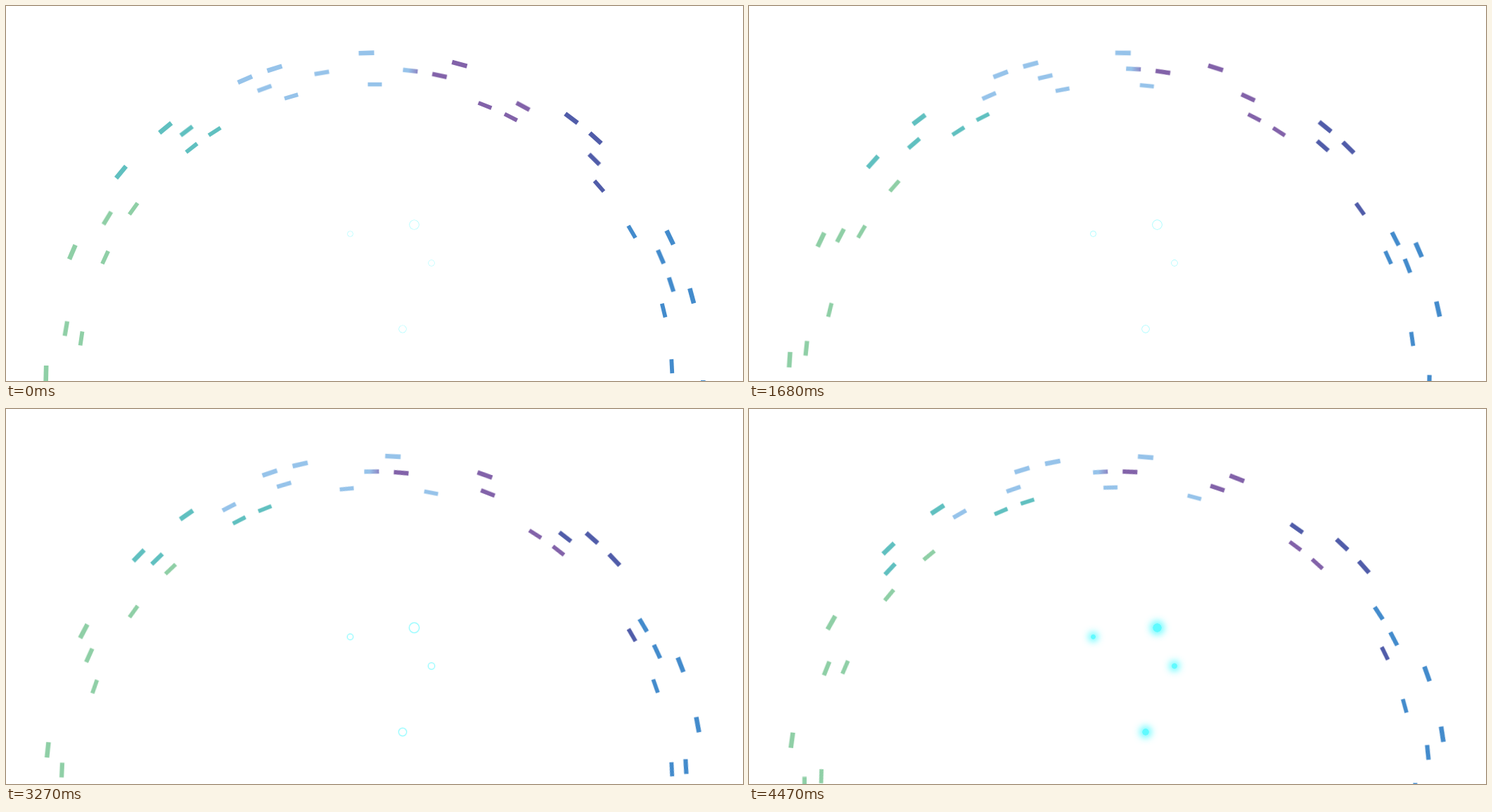
Animation, 1048 px wide and 534 px high, one loop 4500 ms. Source, as an HTML page:

```html
<!DOCTYPE html>
<html lang="en">
<head>
<meta charset="utf-8">
<title>Dashed arcs</title>
<style>
  html, body { margin: 0; width: 100%; height: 100%; overflow: hidden; background: #fff; }
  #stage { position: relative; width: 1048px; height: 534px; overflow: hidden; }
  svg { position: absolute; left: 0; top: 0; }

  .ring { animation: turn 4.5s linear infinite; }
  @keyframes turn { to { transform: rotate(var(--turn)); } }

  .dot {
    position: absolute;
    left: calc(var(--x) - var(--r));
    top: calc(var(--y) - var(--r));
    width: calc(2 * var(--r));
    height: calc(2 * var(--r));
    border-radius: 50%;
    animation: glow 4.5s infinite;
  }
  @keyframes glow {
    0%, 40%, 80% {
      background: rgba(95, 250, 255, 0);
      box-shadow: 0 0 0 .6px rgba(95, 250, 255, .6);
      animation-timing-function: ease-in;
    }
    10%, 30%, 50%, 70%, 90% {
      background: rgba(95, 250, 255, 0);
      box-shadow: 0 0 2px 1.6px rgba(95, 250, 255, .85);
      animation-timing-function: ease-out;
    }
    20%, 60%, 100% {
      background: rgba(95, 250, 255, 1);
      box-shadow: 0 0 10px 4px rgba(95, 250, 255, .85);
      animation-timing-function: linear;
    }
  }
</style>
</head>
<body>
<div id="stage">
  <svg id="arcs" width="1048" height="534" viewBox="0 0 1048 534">
    <defs>
      <linearGradient id="blend">
        <stop offset=".35" stop-color="#96c3ea"/>
        <stop offset="1" stop-color="#8c86c4"/>
      </linearGradient>
    </defs>
  </svg>
  <div class="dot" style="--x:580.5px; --y:311px; --r:6.5px"></div>
  <div class="dot" style="--x:489.3px; --y:324.3px; --r:3.4px"></div>
  <div class="dot" style="--x:605px; --y:366px; --r:4.2px"></div>
  <div class="dot" style="--x:564px; --y:460px; --r:5.2px"></div>
</div>
<script>
  const green = '#8fcfa6', teal = '#60c0c0', sky = '#96c3ea',
        purple = '#8262a9', indigo = '#505ca9', blue = '#438bcc';

  // dashes: [colour, ...angles clockwise from the top, in degrees]
  const rings = [
    { x: 524, y: 534, r: 467.2, w: 22, h: 6.6, turn: 6.36, dashes: [
      [green, -88.65, -66.87],
      [teal, -50.48, -39.52],
      [sky, -23.21, -17.7, -1.41],
      [purple, 15],
      [indigo, 36.82, 42.27],
      [blue, 64.07, 74.95, 91.23]] },
    { x: 523.3, y: 533.3, r: 444.2, w: 21, h: 6.2, turn: -9.79, dashes: [
      [green, -80.42, -58.63],
      [teal, -36.87],
      [sky, -20.52, -9.62],
      ['url(#blend)', 6.68],
      [purple, 12.11, 28.48],
      [indigo, 44.85],
      [blue, 66.65, 72.09, 94]] },
    { x: 525, y: 534, r: 422.3, w: 20, h: 5.8, turn: 15.03, dashes: [
      [green, -103.44, -81.75, -65.38, -54.49],
      [teal, -38.18, -32.73],
      [sky, -16.42, -0.07],
      [purple, 21.68, 27.17],
      [indigo, 48.93],
      [blue, 59.79, 76.23, 87.15]] }
  ];

  function add(parent, tag, attrs) {
    const el = document.createElementNS('http://www.w3.org/2000/svg', tag);
    for (const key in attrs) el.setAttribute(key, attrs[key]);
    return parent.appendChild(el);
  }

  const arcs = document.getElementById('arcs');
  for (const { x, y, r, w, h, turn, dashes } of rings) {
    const hub = add(arcs, 'g', { transform: `translate(${x} ${y})` });
    const ring = add(hub, 'g', { class: 'ring', style: `--turn:${turn}deg` });
    for (const [fill, ...angles] of dashes) {
      for (const a of angles) {
        add(ring, 'rect', {
          x: -w / 2, y: -r - h / 2, width: w, height: h,
          fill, transform: `rotate(${a})`
        });
      }
    }
  }
</script>
</body>
</html>
```
